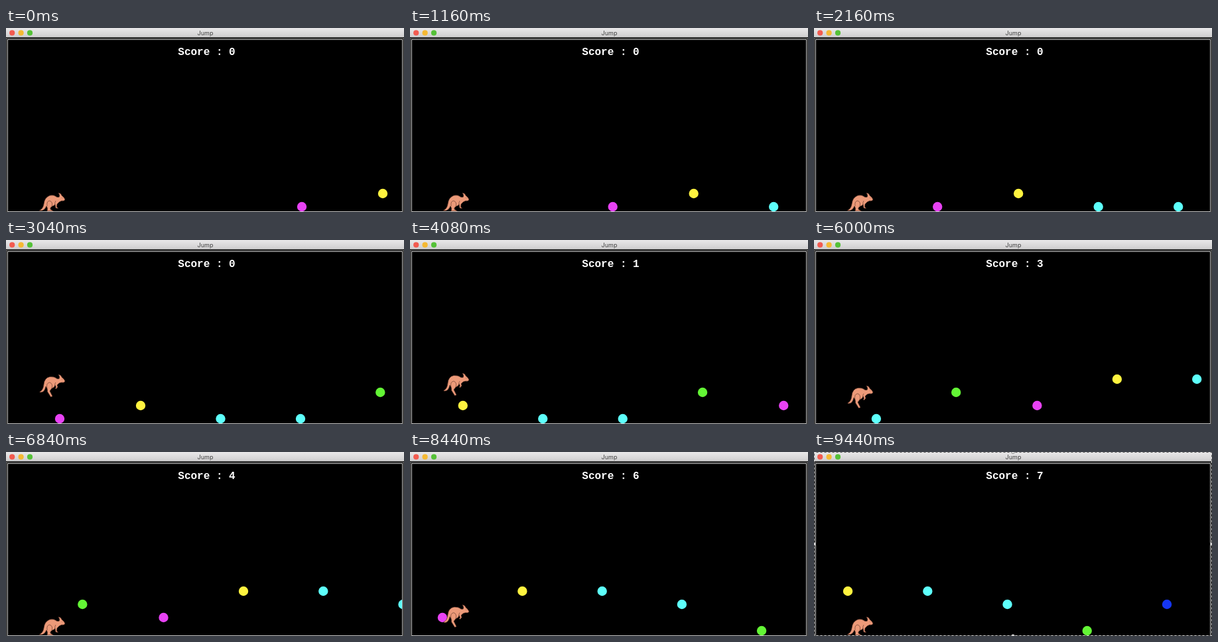
Animation, 600 px wide and 279 px high, one loop 9480 ms. Source, as an HTML page:

```html
<!DOCTYPE html>
<html lang="en">
<head>
<meta charset="utf-8">
<title>Jump</title>
<style>
  html, body { margin: 0; width: 100%; height: 100%; overflow: hidden; background: #000; }
  svg { display: block; width: 600px; height: 279px; }
  .title { font: 9px Inter, sans-serif; fill: #444; }
  .score { font: bold 16px "Liberation Mono", monospace; fill: #fff; white-space: pre; }
  .roo path { fill: #ec9a79; stroke: #5b3328; stroke-width: .6; stroke-linejoin: round; }
  .roo .line { fill: none; }
</style>
</head>
<body>
<svg viewBox="0 0 600 279" text-anchor="middle">
  <defs>
    <linearGradient id="bar" x2="0" y2="1">
      <stop stop-color="#e9e8e9"/><stop offset="1" stop-color="#cfcecf"/>
    </linearGradient>
    <clipPath id="field"><path d="M3 18H597V278H3Z"/></clipPath>
  </defs>
  <rect width="600" height="279"/>
  <rect width="600" height="14" fill="url(#bar)"/>
  <circle cx="9.2" cy="7.4" r="4.1" fill="#f25b50"/>
  <circle cx="22.6" cy="7.4" r="4.1" fill="#f5b932"/>
  <circle cx="36" cy="7.4" r="4.1" fill="#55c138"/>
  <text class="title" x="300.5" y="10.6">Jump</text>
  <path d="M.5 279V15.5H599.5V279" fill="none" stroke="#777"/>
  <rect x="2.5" y="17.5" width="595" height="261" fill="none" stroke="#c8c8c8"/>
  <text class="score" x="302.5" y="40.5"></text>

  <g clip-path="url(#field)">
    <g id="balls"></g>
    <g class="roo">
      <g id="standing">
        <path d="M50 277Q56 274 57 267Q58 257 66 254Q72 252.500 77 256.500L80 256.500Q82 254 79 250Q83 250.500 84 254Q87 256 89 260Q88 263 84 262Q80 263 77 267L76.500 271L78.500 273.500L75 273L74 267.500Q72 270 70 270Q66 272 67 275L71.500 277.700H62Q63.500 273 61 270Q58 278 50 277Z"/>
        <path class="line" d="M62 270Q61 262 66 262Q71 264 69 270M74 268Q73 265 75 262M84.500 257.500h.6"/>
      </g>
      <g id="leaping">
        <path d="M51 276Q56 274 57 265Q58 255 66 253.500Q73 253 77 256.500L80 256.500Q82 254 79 250Q83 250.500 84 254Q87 256 89 260Q88 263 84 262Q80 262 77 266L78 269L75.500 272L74.500 271L75.500 269L74 266Q73 270 69 271L66 275L70 283L67.500 284L62.500 276Q63 271 60 268Q58 278 51 277Z"/>
        <path class="line" d="M62 271Q60 263 66 262Q71 264 69 271M74 267Q73 264 75 262M84.500 257.500h.6"/>
      </g>
    </g>
  </g>

  <g id="selection">
    <rect x=".5" y=".5" width="599" height="278" fill="none" stroke="#555"/>
    <rect x=".5" y=".5" width="599" height="278" fill="none" stroke="#ddd" stroke-dasharray="3 3"/>
    <g fill="#ddd" stroke="#777" stroke-width=".7">
      <circle cx="0" cy="139.500" r="2.500"/><circle cx="600" cy="139.500" r="2.500"/>
      <circle cx="300" cy="0" r="2.500"/><circle cx="300" cy="279" r="2.500"/>
    </g>
  </g>
</svg>
<script>
const LOOP = 9480, STEP = 40;
const SCORE_X = 67;
const JUMP_HEIGHT = 51, JUMP_HALF = 290;
const jumpPeaks = [3130, 4150, 5160, 6190, 8208];
const magenta = '#e842f4', yellow = '#fff33f', cyan = '#5dfffb', green = '#63f535', blue = '#1536f4';

// start x, y, colour
const balls = [
  [446, 271, magenta], [568, 251, yellow], [688.5, 271, cyan], [809, 271, cyan],
  [929.3, 231, green], [1051.5, 251, magenta], [1172, 211, yellow], [1292.3, 211, cyan],
  [1412.5, 231, cyan], [1532.7, 271, green], [1653, 231, blue]
];
// time, distance scrolled
const scroll = [[0, 0], [1160, 140.3], [3040, 365], [5120, 611.5], [6840, 814], [8440, 1002.6], [9480, 1125.7]];

const find = selector => document.querySelector(selector);
const show = (node, visible) => node.setAttribute('visibility', visible ? 'visible' : 'hidden');
const roo = find('.roo'), score = find('.score');
const standing = find('#standing'), leaping = find('#leaping'), selection = find('#selection');

const dots = balls.map(([, y, colour]) => {
  const dot = document.createElementNS(roo.namespaceURI, 'circle');
  dot.setAttribute('cy', y);
  dot.setAttribute('r', 7.2);
  dot.setAttribute('fill', colour);
  return find('#balls').appendChild(dot);
});

function distanceAt(t) {
  const i = scroll.findIndex(([time]) => time > t);
  const [t0, d0] = scroll[i - 1], [t1, d1] = scroll[i];
  return d0 + (d1 - d0) * (t - t0) / (t1 - t0);
}

function heightAt(t) {
  const arcs = jumpPeaks.map(peak => 1 - ((t - peak) / JUMP_HALF) ** 2);
  return JUMP_HEIGHT * Math.max(0, ...arcs);
}

function draw(now) {
  const t = Math.floor(now % LOOP / STEP) * STEP;
  const distance = distanceAt(t), height = heightAt(t);
  dots.forEach((dot, i) => dot.setAttribute('cx', balls[i][0] - distance));
  score.textContent = 'Score : ' + balls.filter(([x]) => x - distance < SCORE_X).length;
  roo.setAttribute('transform', `translate(0 ${-height})`);
  show(standing, height === 0);
  show(leaping, height > 0);
  show(selection, t >= LOOP - STEP);
}

const start = performance.now();
function tick() {
  draw(performance.now() - start);
  requestAnimationFrame(tick);
}
tick();
</script>
</body>
</html>
```
